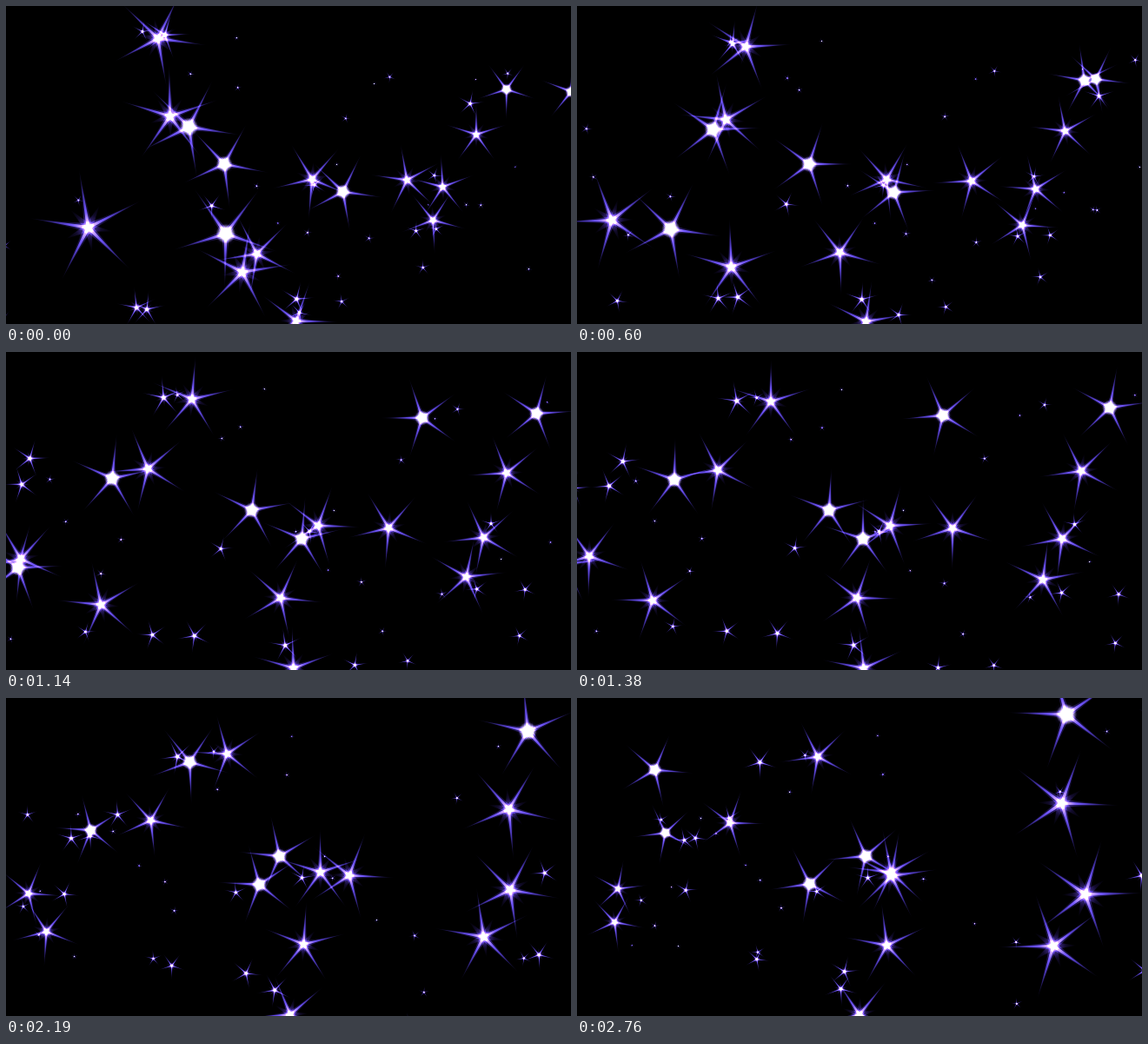
These frames come from a looping animation (650x366 px, 2790 ms). An HTML page with a canvas:

```html
<!DOCTYPE html>
<html lang="en">
<head>
<meta charset="utf-8">
<title>Turning star field</title>
<style>
  html, body { margin: 0; width: 100%; height: 100%; overflow: hidden; background: #000; }
  canvas { display: block; }
</style>
</head>
<body>
<canvas width="650" height="366"></canvas>
<script>
const WIDTH = 650, HEIGHT = 366, CX = 325, CY = 183;
const FOCAL = CY / Math.tan(Math.PI * 25 / 180);   // 50 degree field of view
const STEP_MS = 30, LOOP_MS = 2790, MIDDLE = 45;   // the first step is held twice
const SPIN = 0.01;                                 // radians per step
const SMALL_COUNT = 50, BIG_LENGTH = 46;

const ctx = document.querySelector("canvas").getContext("2d");

let seed = 7;
function random(min = 0, max = 1) {
  seed = (seed * 16807) % 2147483647;
  return min + (max - min) * seed / 2147483647;
}

// A star is placed by its screen position, depth and ray length halfway through the loop.
function makeStar(x, y, depth, length, tilt, soft) {
  return {
    x: (x - CX) / FOCAL * depth,
    y: (y - CY) / FOCAL * depth,
    z: depth - 1,
    size: length * depth,
    tilt: tilt * Math.PI / 180,
    soft
  };
}

// Key stars: x, y, depth, tilt in degrees.
const bright = [
  [421, 73, 0.336, 3], [112, 147, 0.636, 27], [-13, 244, 0.407, 37],
  [329, 215, 0.735, 26], [290, 182, 1.285, 29], [613, 64, 0.671, 36]
];
const soft = [
  [162, 136, 0.84, -1], [14, 235, 0.6, -9], [87, 286, 0.501, 9], [432, 203, 0.737, -10],
  [360, 200, 1.02, 41], [580, 137, 0.759, 0], [558, 215, 0.92, 69], [536, 262, 0.911, 33],
  [223, 57, 1.287, 26], [322, 283, 1.239, 45], [330, 364, 0.974, 19]
];
const bigStars = (list, isSoft) =>
  list.map(([x, y, depth, tilt]) => makeStar(x, y, depth, BIG_LENGTH, tilt, isSoft));

// Small stars also fill the space beside the stage, from where they turn into view.
const smallStars = Array.from({ length: SMALL_COUNT }, (_, i) => makeStar(
  -140 + (WIDTH + 280) * (i + random()) / SMALL_COUNT, random(0, HEIGHT),
  random(0.9, 1.7), 4 + 20 * random() ** 2, random(0, 72), true
));
const stars = [...bigStars(bright, false), ...bigStars(soft, true), ...smallStars];

// Shapes and paints are one unit in radius and scaled when drawn.
function spikes(radius, waist, shift = 0) {
  const path = new Path2D();
  for (let i = 0; i < 10; i++) {
    const r = i % 2 ? waist : radius, a = i * Math.PI / 5 + shift;
    path.lineTo(r * Math.sin(a), -r * Math.cos(a));
  }
  path.closePath();
  return path;
}

function radial(radius, ...stops) {
  const paint = ctx.createRadialGradient(0, 0, 0, 0, 0, radius);
  stops.forEach(([at, color]) => paint.addColorStop(at, color));
  return paint;
}

const disc = new Path2D();
disc.arc(0, 0, 1, 0, 2 * Math.PI);
const rays = spikes(1.08, 0.05), halo = spikes(0.9, 0.11), shortRays = spikes(0.45, 0.1, Math.PI / 5);
const rayPaint = radial(1.08, [0, "#d8c8ff"], [0.1, "#a48cf5"], [0.25, "rgba(105,82,225,.9)"],
  [0.55, "rgba(78,60,190,.7)"], [1, "rgba(50,38,150,0)"]);
const haloPaint = radial(0.9, [0, "rgba(120,90,240,.55)"], [0.35, "rgba(70,48,180,.32)"], [1, "rgba(40,20,130,0)"]);
const shortPaint = radial(0.45, [0, "rgba(130,100,240,.5)"], [0.5, "rgba(75,48,180,.25)"], [1, "rgba(50,30,150,0)"]);
const glowPaint = radial(0.24, [0, "rgba(130,95,245,.6)"], [0.5, "rgba(85,55,200,.22)"], [1, "rgba(60,30,170,0)"]);
const brightCore = radial(0.19, [0, "#fff"], [0.5, "#fff"], [1, "rgba(170,140,255,0)"]);
const softCore = radial(0.12, [0, "#fff"], [0.3, "rgba(250,240,255,.85)"], [1, "rgba(160,130,255,0)"]);

function paint(path, style) {
  ctx.fillStyle = style;
  ctx.fill(path);
}

// Turns about the vertical axis; the camera is one unit away from it.
function drawStar(star, step) {
  const angle = SPIN * (step - MIDDLE), c = Math.cos(angle), s = Math.sin(angle);
  const depth = 1 + star.z * c - star.x * s;
  if (depth < 0.05) return;
  const scale = FOCAL / depth, length = star.size / depth;
  ctx.save();
  ctx.translate(CX + scale * (star.x * c + star.z * s), CY + scale * star.y);
  ctx.rotate(star.tilt - SPIN * step);
  ctx.scale(length, length);
  paint(disc, glowPaint);
  paint(halo, haloPaint);
  if (star.soft) paint(shortRays, shortPaint);
  paint(rays, rayPaint);
  paint(disc, star.soft ? softCore : brightCore);
  ctx.restore();
}

function render(time) {
  const step = Math.max(0, Math.floor(time % LOOP_MS / STEP_MS) - 1);
  ctx.globalCompositeOperation = "source-over";
  ctx.fillStyle = "#000";
  ctx.fillRect(0, 0, WIDTH, HEIGHT);
  ctx.globalCompositeOperation = "lighter";
  stars.forEach(star => drawStar(star, step));
}

const start = performance.now();
function tick() {
  render(performance.now() - start);
  requestAnimationFrame(tick);
}
tick();
</script>
</body>
</html>
```
